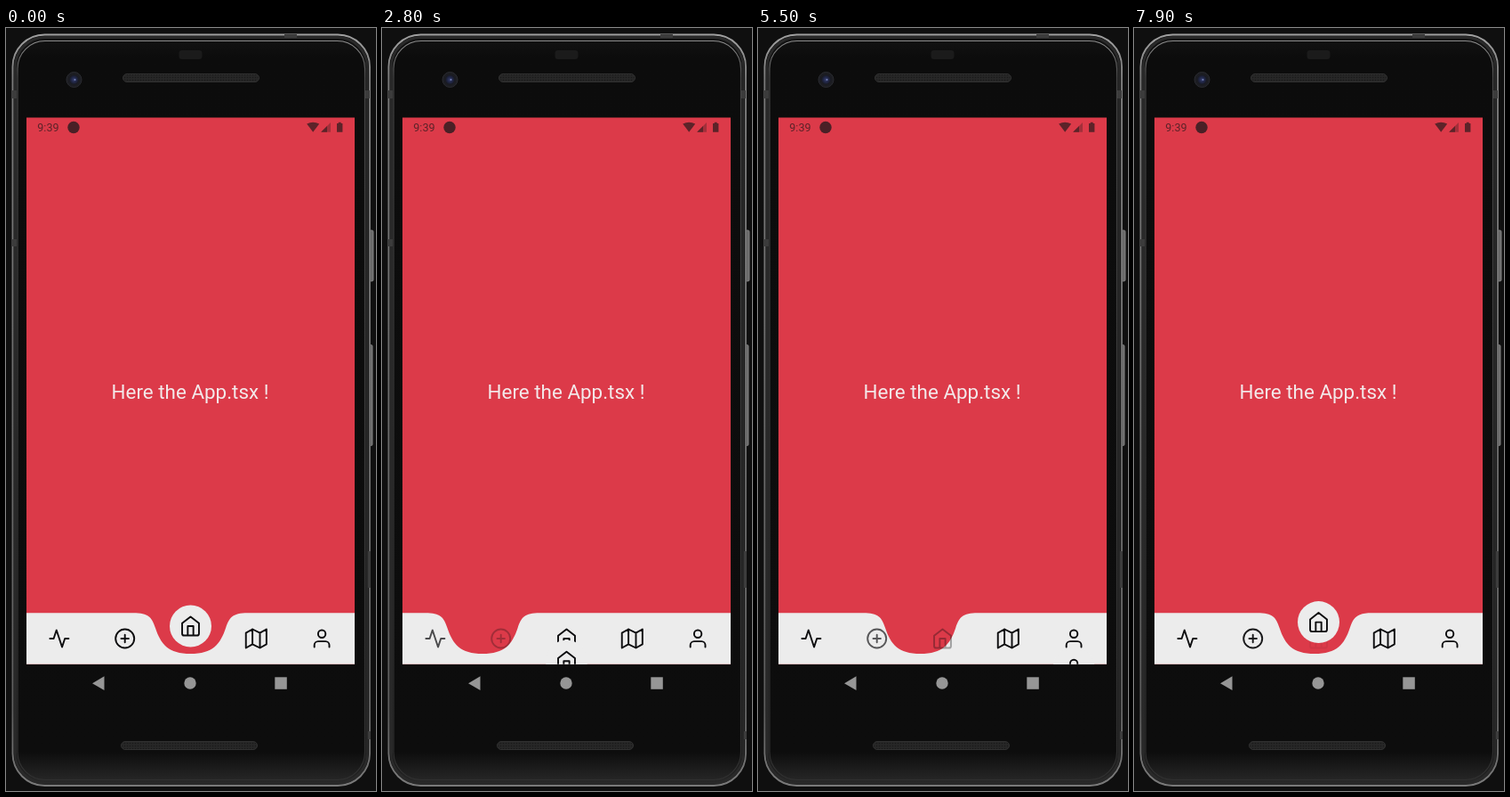
An HTML page for the animation above (8 s loop, 416x856 px).

```html
<!DOCTYPE html>
<html lang="en">
<head>
<meta charset="utf-8">
<title>Curved tab bar</title>
<style>
  html, body { margin: 0; width: 100%; height: 100%; overflow: hidden; background: #0f0f0f; }
  svg { display: block; }
  text { font-family: Roboto, "Liberation Sans", sans-serif; }
  .icon { fill: none; stroke: #0d0d0f; stroke-width: 1.85; stroke-linecap: round; stroke-linejoin: round; }
</style>
</head>
<body>
<svg width="416" height="856" viewBox="0 0 416 856">
  <defs>
    <linearGradient id="rim" x2="0" y2="1">
      <stop offset="0" stop-color="#a0a0a0"/>
      <stop offset=".06" stop-color="#7c7c7c"/>
      <stop offset=".9" stop-color="#606060"/>
      <stop offset="1" stop-color="#7a7a7a"/>
    </linearGradient>
    <linearGradient id="edge" x2="0" y2="1">
      <stop offset="0" stop-color="#8c8c8c"/>
      <stop offset=".05" stop-color="#484848"/>
      <stop offset="1" stop-color="#303030"/>
    </linearGradient>
    <linearGradient id="body" x2="0" y2="1">
      <stop offset="0" stop-color="#141414"/>
      <stop offset=".03" stop-color="#0c0c0c"/>
      <stop offset=".955" stop-color="#0d0d0d"/>
      <stop offset="1" stop-color="#2b2b2b"/>
    </linearGradient>
    <radialGradient id="lens">
      <stop offset="0" stop-color="#39426f"/>
      <stop offset=".5" stop-color="#22284a"/>
      <stop offset="1" stop-color="#17181f"/>
    </radialGradient>
    <pattern id="mesh" width="3" height="3" patternUnits="userSpaceOnUse">
      <rect width="3" height="3" fill="#272727"/>
      <circle cx="1.5" cy="1.5" r=".8" fill="#191919"/>
    </pattern>
    <clipPath id="screen"><rect x="23" y="100.500" width="369" height="613.300"/></clipPath>

    <path id="activity" d="M22 12h-4l-3 9L9 3l-3 9H2"/>
    <path id="plus" d="M2 12a10 10 0 1 0 20 0a10 10 0 1 0-20 0M12 8v8M8 12h8"/>
    <path id="home" d="M3 9l9-7 9 7v11a2 2 0 0 1-2 2H5a2 2 0 0 1-2-2zM9 22V12h6v10"/>
    <path id="map" d="M1 6v16l7-4 8 4 7-4V2l-7 4-8-4zM8 2v16M16 6v16"/>
    <path id="user" d="M20 21v-2a4 4 0 0 0-4-4H8a4 4 0 0 0-4 4v2M8 7a4 4 0 1 0 8 0a4 4 0 1 0-8 0"/>
  </defs>

  <rect width="416" height="856" fill="#0f0f0f"/>

  <!-- phone -->
  <g fill="#6a6a6a" stroke="#8e8e8e" stroke-width=".8">
    <rect x="407.500" y="227" width="5.500" height="57" rx="1.5"/>
    <rect x="407.500" y="355.500" width="4.500" height="113" rx="1.5"/>
  </g>
  <rect x="7.500" y="7.500" width="401.500" height="842.500" rx="36" fill="url(#body)" stroke="url(#rim)" stroke-width="1.900"/>
  <rect x="10.500" y="10.500" width="395.500" height="836.500" rx="33" fill="none" stroke="#292929" stroke-width="3"/>
  <rect x="13" y="14.500" width="390.500" height="829" rx="31" fill="none" stroke="url(#edge)" stroke-width="1.200"/>
  <g fill="#3c3c3c">
    <rect x="7" y="70" width="5" height="9"/>
    <rect x="404" y="70" width="5" height="9"/>
    <rect x="7" y="237" width="5" height="8"/>
    <rect x="313" y="7" width="14" height="4"/>
    <rect x="407" y="587" width="3" height="41"/>
    <rect x="407" y="789" width="3" height="9"/>
  </g>
  <rect x="194.500" y="25" width="26" height="10" rx="3" fill="#1b1b1b"/>
  <g fill="url(#mesh)" stroke="#313131">
    <rect x="131.500" y="51.500" width="153" height="9" rx="4.500"/>
    <rect x="129.500" y="800.500" width="153" height="9" rx="4.500"/>
  </g>
  <circle cx="76.500" cy="58" r="8.500" fill="#1c1d22" stroke="#2b2c31"/>
  <circle cx="76.500" cy="58" r="5.500" fill="url(#lens)"/>
  <circle cx="77.500" cy="58" r="1" fill="#7683b8"/>

  <!-- screen -->
  <g clip-path="url(#screen)">
    <rect x="23" y="100" width="369" height="614" fill="#dc3a49"/>
    <g fill="#5c2329">
      <text x="35.300" y="116.200" font-size="12.560">9:39</text>
      <circle cx="76" cy="111.500" r="6.700" fill="#4a2026"/>
      <path d="M338.200 107.500q7-3.700 14 0l-7 9.300z"/>
      <path d="M365 106v10.800h-10.800z" opacity=".45"/>
      <path d="M361 110v6.800h-6.800z"/>
      <path d="M372 107h1.700v-1.300h3V107h1.700v9.800H372z"/>
    </g>
    <text x="207" y="416" font-size="22.420" text-anchor="middle" fill="#f3e9ea">Here the App.tsx !</text>
    <path id="bar" fill="#ececec"/>
    <g id="tabs"></g>
  </g>

  <!-- system buttons -->
  <g fill="#969696">
    <path d="M97 735.200L110.500 727.300V743z"/>
    <circle cx="207" cy="735" r="6.700"/>
    <rect x="302.300" y="728.300" width="13.500" height="13.500"/>
  </g>
</svg>

<script>
const LOOP = 8000, TAB = 73.8, BAR_TOP = 656.3, TRAVEL = 57.4;
const ICON_Y = 685, ACTIVE_Y = 671;
const names = ['activity', 'plus', 'home', 'map', 'user'];
const tabX = i => 23 + TAB * (i + 0.5);

// Each move: the old bubble drops, then notch and new bubble spring into place.
const moves = [
  { drop: 1110, start: 1330, from: 2, to: 0, rate: 1.8 },
  { drop: 2620, start: 2728, from: 0, to: 2, rate: 1 },
  { drop: 3970, start: 4080, from: 2, to: 1, rate: 1 },
  { drop: 5340, start: 5450, from: 1, to: 4, rate: 1 },
  { drop: 6605, start: 6690, from: 4, to: 0, rate: 1 },
  { drop: 7480, start: 7590, from: 0, to: 2, rate: 1 }
];
const DROP_TIME = 85;

const bar = document.getElementById('bar');
const iconMarkup = n => `<use href="#${n}" class="icon" transform="scale(1.05) translate(-12 -12)"/>`;
const tabs = document.getElementById('tabs');
tabs.innerHTML =
  names.map((n, i) => `<g class="base" transform="translate(${tabX(i)} ${ICON_Y})">${iconMarkup(n)}</g>`).join('') +
  names.map(n => `<g class="bubble"><circle r="23.500" fill="#ececec"/>${iconMarkup(n)}</g>`).join('');
const bases = tabs.querySelectorAll('.base');
const bubbles = tabs.querySelectorAll('.bubble');

const clamp = v => Math.min(1, Math.max(0, v));
const smooth = v => v * v * (3 - 2 * v);

function glide(t) {
  const k = 17.3 * Math.max(0, t);
  return 1 - (1 + k) * Math.exp(-k);
}

function bounce(t) {
  if (t <= 0) return 0;
  const w = 13.7, z = 0.63, s = Math.sqrt(1 - z * z), a = w * s * t;
  return 1 - Math.exp(-z * w * t) * (Math.cos(a) + z / s * Math.sin(a));
}

function notch(c) {
  return `M-100 ${BAR_TOP}H${c - 64.5}` +
    'c17.500 0 21 5 25 17c6 18 14.500 28.800 39.500 28.800' +
    's33.500-10.800 39.500-28.800c4-12 7.500-17 25-17' +
    'H500V720H-100z';
}

function render(t) {
  const lift = [0, 0, 0, 0, 0];
  let x = tabX(2);
  const m = moves.filter(v => v.drop <= t).pop();
  if (m) {
    const s = (t - m.start) / 1000 * m.rate;
    x = tabX(m.from) + (tabX(m.to) - tabX(m.from)) * glide(s);
    lift[m.from] = 1 - smooth(clamp((t - m.drop) / DROP_TIME));
    lift[m.to] = bounce(s);
  } else {
    lift[2] = 1;
  }
  bar.setAttribute('d', notch(x));
  names.forEach((_, i) => {
    bases[i].setAttribute('opacity', clamp(Math.abs(x - tabX(i)) / TAB));
    bubbles[i].setAttribute('transform', `translate(${tabX(i)} ${ACTIVE_Y + TRAVEL * (1 - lift[i])})`);
    bubbles[i].setAttribute('visibility', lift[i] > 0 ? 'visible' : 'hidden');
  });
}

const origin = performance.now();
function tick() {
  render((performance.now() - origin) % LOOP);
  requestAnimationFrame(tick);
}
tick();
</script>
</body>
</html>
```
